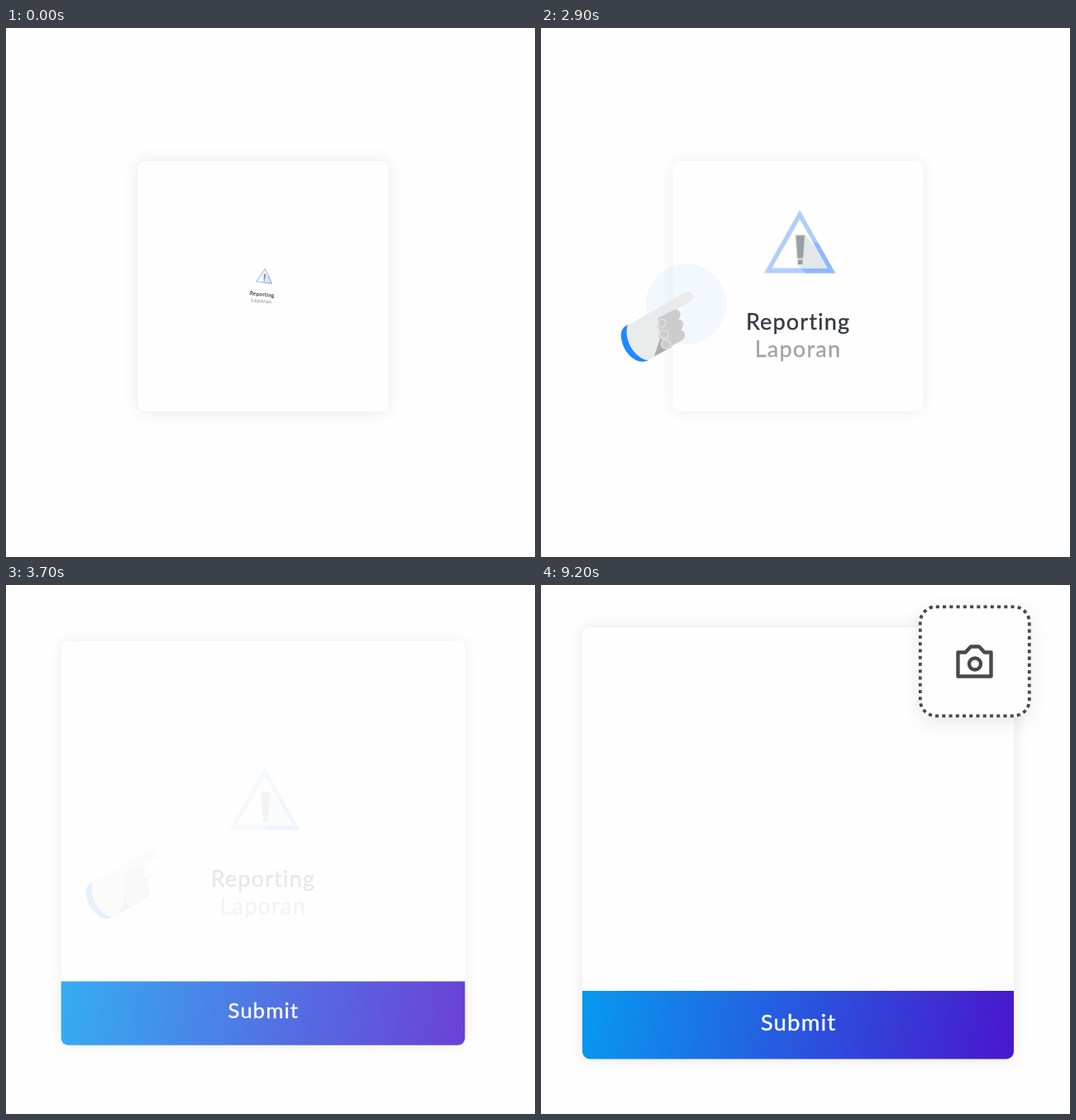
Recreate the animation shown at these times as an HTML page. Size 640 by 640 pixels, loop 9.6 s.

```html
<!DOCTYPE html>
<html lang="en">
<head>
<meta charset="utf-8">
<title>Incident reporting</title>
<style>
  html, body { margin: 0; width: 100%; height: 100%; overflow: hidden; background: #fefefe; }
  svg { display: block; width: 100vw; height: 100vh; }
  text { font-family: Lato, "Open Sans", sans-serif; font-size: 27px; letter-spacing: .75px; fill: #2b2d36; }
  .mid { text-anchor: middle; }
  .medium { stroke: currentColor; stroke-width: .4px; }
  .card { fill: #fefefe; filter: drop-shadow(0 0 9px rgba(0, 0, 0, .09)); }
  .select { fill: #fefefe; filter: drop-shadow(0 1px 6px rgba(0, 0, 0, .11)); }
  .lift { fill: #fefefe; filter: drop-shadow(0 7px 10px rgba(50, 50, 80, .1)); }
  .ink { fill: none; stroke: #4a4a4b; stroke-width: 4.4; stroke-linejoin: round; }
</style>
</head>
<body>
<svg viewBox="0 0 640 640">
  <defs>
    <linearGradient id="bar" gradientUnits="userSpaceOnUse" x1="58" y1="491" x2="566" y2="573">
      <stop offset="0" stop-color="#0898ef"/>
      <stop offset=".6" stop-color="#2f49db"/>
      <stop offset="1" stop-color="#4917cd"/>
    </linearGradient>
  </defs>

  <rect id="tile" class="card" x="159.5" y="161" width="303" height="303" rx="9"/>

  <g id="panel">
    <rect class="card" x="50" y="51" width="522" height="522.5" rx="9"/>
    <path fill="url(#bar)" d="M50 491H572V564.5a9 9 0 0 1-9 9H59a9 9 0 0 1-9-9Z"/>
    <text class="mid medium" x="311.5" y="539" style="font-size:27.5px;letter-spacing:1.2px;fill:#fff;color:#fff">Submit</text>
  </g>

  <g id="intro">
    <path fill="#a9c9fc" d="M313 220L356 296.500H270Z"/>
    <path fill="#84b1f9" d="M326 259L335.500 260L356 296.500H320L313 289Z"/>
    <path fill="#fefefe" d="M313 231L346.500 290.500H279.500Z"/>
    <path fill="#e0e5e6" d="M319 249L334 268.500L346.500 290.500H314L310 286Z"/>
    <g fill="#8d969a" stroke="#dde2e3" stroke-width="2.500" paint-order="stroke">
      <path d="M308.500 251H319L317 278.500H310.500Z"/>
      <path d="M311 280.500H316.500V286H311Z"/>
    </g>
    <text class="mid medium" x="311" y="364.500" style="letter-spacing:1.15px;fill:#22252f;color:#22252f">Reporting</text>
    <text class="mid medium" x="311" y="397.500" style="letter-spacing:1.25px;fill:#9a9a9b;color:#9a9a9b">Laporan</text>
  </g>

  <circle id="halo" cx="175.500" cy="334" r="48.700" fill="#4285f4" fill-opacity=".08"/>

  <g id="hand">
    <path fill="#087cff" d="M106 359C96 362 95 372 99 383C104 397 117 408 130 402L112 366Z"/>
    <path fill="#e8e9e9" d="M104.500 360L174 320Q180 317 183 322Q185 328 180 331L160 343L146 354L144 376L137 398L129 402C113 399 100 378 104.500 360Z"/>
    <path fill="#c8c8c8" d="M141 351L162 340.500Q168 340 169 347Q168 351 166 352.500Q172 353 172 358Q172 363 169 365Q175 367 174 373Q173 377 168 379L137 397L144 377Q141 370 144 366Q140 361 142 357Z"/>
    <path fill="#a4a4a4" d="M137 397.500L144 376L158 386Z"/>
    <g fill="#c8c8c8" stroke="#e6e6e6" stroke-width="1.100">
      <circle cx="146.500" cy="357" r="4.700"/>
      <circle cx="149" cy="370.500" r="5"/>
      <circle cx="151" cy="382.500" r="5.600"/>
    </g>
  </g>

  <g id="fields">
    <rect class="select" x="119" y="224" width="386" height="68" rx="8"/>
    <path d="M117.500 437H512" stroke="#e4e4e4" stroke-width="4"/>
    <g id="labels">
      <text class="medium" x="116" y="129" style="font-size:30px;letter-spacing:1.5px;fill:#23252f;color:#23252f">Incident</text>
      <text x="117.500" y="200">Type of incident</text>
      <text class="medium" x="147" y="265.500" style="fill:#000;color:#000">House theft</text>
      <path d="M465.500 253L474.700 262.500L484 253" fill="none" stroke="#c9cacb" stroke-width="3.800"/>
      <text x="116" y="370.500" style="letter-spacing:.85px">Describe incident</text>
    </g>
  </g>

  <g id="camera">
    <rect class="lift" x="457" y="24.500" width="135.500" height="135.500" rx="20"/>
    <rect class="ink" x="458.800" y="26.300" width="132" height="132" rx="19" pathLength="480"
      style="stroke-width:3.800;stroke-dasharray:4 4"/>
    <path class="ink" d="M504.500 81.500H513.500L520 74.500H530L536.500 81.500H544.500V110.500H504.500Z"/>
    <circle class="ink" cx="525" cy="95.500" r="7"/>
  </g>
</svg>
<script>
const LOOP = 9600, STEP = 100;

// Each track is a list of [time, value].
const tracks = {
  tile: { opacity: [[2800, 1], [3200, 0]] },
  intro: {
    at: [311, 312],
    scale: [[0, .238], [100, .6], [200, .92], [300, 1.04], [400, 1]],
    turn: [[0, 6], [100, 3], [200, 1], [300, 0]],
    opacity: [[2800, 1], [3800, 0]]
  },
  halo: { opacity: [[1100, 0], [1400, .85], [1500, .85], [1600, 1], [2800, 1], [3200, 0]] },
  hand: { opacity: [[1100, 0], [1400, 1], [2800, 1], [3800, 0]] },
  panel: {
    at: [311, 312],
    scale: [[3200, .68], [3300, .724], [3700, .936], [3800, 1]],
    opacity: [[3200, 0], [3300, .135], [3700, .81], [3800, 1]]
  },
  fields: { opacity: [[3700, 0], [3800, 1], [9100, 1], [9200, 0]] },
  labels: { opacity: [[3800, 0], [4200, 1]], shift: [[3800, 16], [4200, 0]] },
  camera: {
    at: [525, 92],
    scale: [[4300, .3], [4400, .5], [4500, .86], [4600, 1.05], [4700, 1]],
    opacity: [[4300, 0], [4400, .5], [4500, 1]]
  }
};

function value(track, t) {
  if (t <= track[0][0]) return track[0][1];
  for (let i = 1; i < track.length; i++) {
    const [t0, a] = track[i - 1], [t1, b] = track[i];
    if (t <= t1) return a + (b - a) * (t - t0) / (t1 - t0);
  }
  return track[track.length - 1][1];
}

const parts = Object.entries(tracks).map(([id, track]) => [document.getElementById(id), track]);

function draw(t) {
  for (const [el, { at: [x, y] = [0, 0], scale, turn, shift, opacity }] of parts) {
    const get = (track, rest) => track ? value(track, t) : rest;
    const alpha = get(opacity, 1);
    el.style.opacity = alpha;
    el.style.visibility = alpha > 0 ? "inherit" : "hidden";
    el.setAttribute("transform",
      `translate(${x} ${y + get(shift, 0)}) rotate(${get(turn, 0)}) scale(${get(scale, 1)}) translate(${-x} ${-y})`);
  }
}

const start = performance.now();
function tick() {
  const t = (performance.now() - start) % LOOP;
  draw(Math.floor(t / STEP) * STEP);
  requestAnimationFrame(tick);
}
tick();
</script>
</body>
</html>
```
